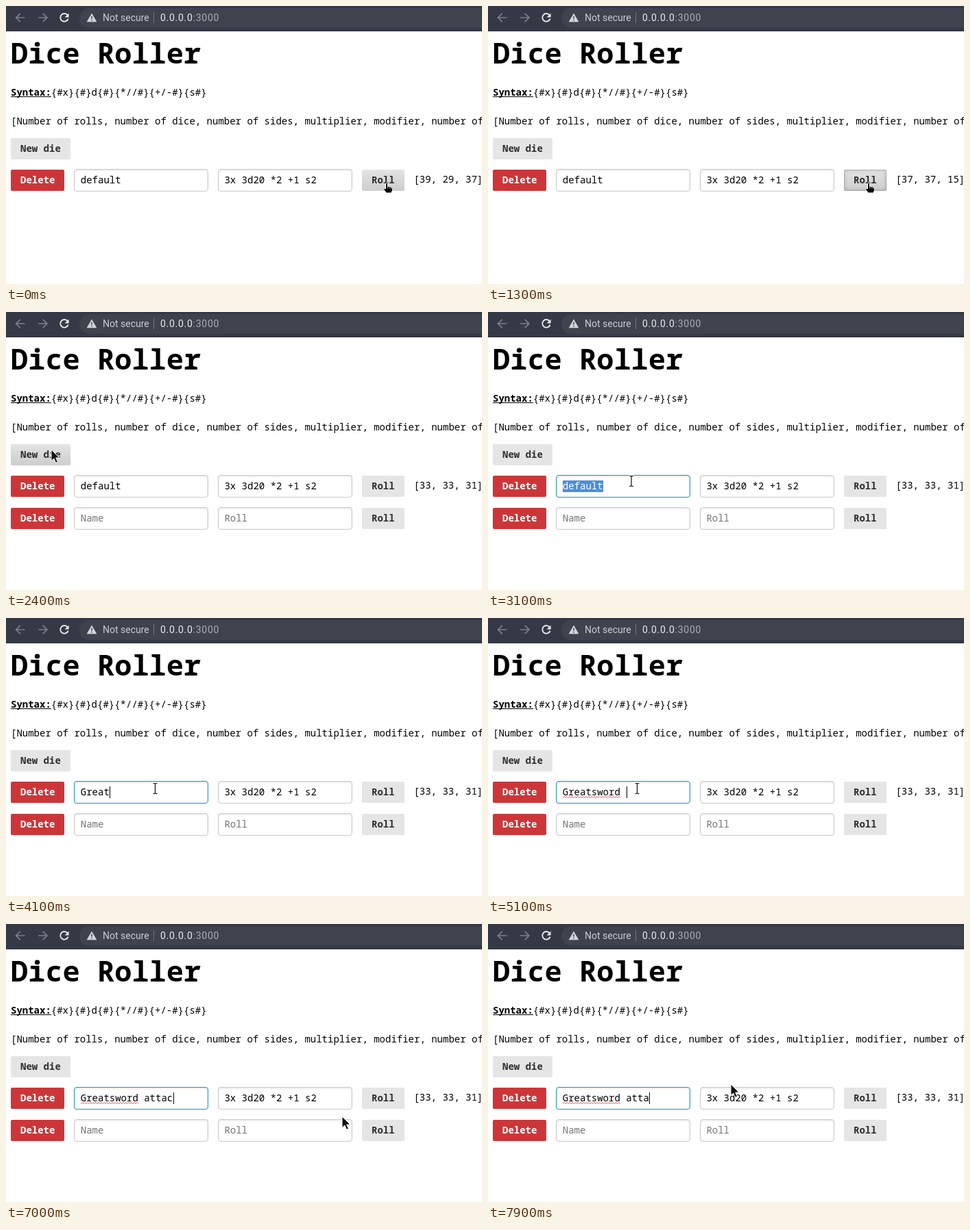
These frames come from a looping animation (694x406 px, 8000 ms). An HTML page:

```html
<!DOCTYPE html>
<html lang="en">
<head>
<meta charset="utf-8">
<title>Dice Roller</title>
<style>
  html, body { margin: 0; width: 100%; height: 100%; overflow: hidden; background: #fff; }
  #stage { position: relative; width: 694px; height: 406px; overflow: hidden; background: #fff; }
  #stage > div, #stage > svg { position: absolute; box-sizing: border-box; }
  .bar { left: 0; top: 0; width: 694px; height: 37px; background: #353945; border-bottom: 1px solid #2b2f39; }
  .pill { left: 107px; top: 3px; width: 620px; height: 29px; border-radius: 14.5px; background: #3e434e; }
  .btn { height: 31px; border-radius: 2px; background-color: #e5e5e5; }
  .red { background-color: #cc3639; }
  .hover { background-image: linear-gradient(transparent, rgba(0,0,0,.05) 40%, rgba(0,0,0,.1)); }
  .down { box-shadow: 0 0 0 1px rgba(0,0,0,.15) inset, 0 0 6px rgba(0,0,0,.2) inset; }
  .field { width: 196px; height: 33px; border: 1px solid #ccc; border-radius: 4px; box-shadow: inset 0 1px 3px #ddd; background: #fff; }
  .focus { border-color: #1e93c6; }
  svg { left: 0; top: 0; }
  text { font: 14px "Noto Sans Mono", "DejaVu Sans Mono", monospace; fill: #000; white-space: pre; }
  .b { font-weight: 700; }
  .label { font-weight: 700; fill: #2e2e2e; }
  .light { fill: #fff; }
  .hint { fill: #757575; }
  .title { font-size: 42px; font-weight: 700; }
  .ui { font: 14px Roboto, "Noto Sans", sans-serif; fill: #c9ccd1; }
  .host { letter-spacing: .72px; fill: #e8e9ec; }
  .off { display: none; }
</style>
</head>
<body>
<div id="stage">
  <div class="bar"></div>
  <div class="pill"></div>
  <div class="btn" id="newBtn" style="left:7px;top:193px;width:87px"></div>
  <svg id="art" width="694" height="406" viewBox="0 0 694 406">
    <g fill="none" stroke="#7c808a" stroke-width="1.7">
      <path d="M27.5 17H15M20.8 10.8 14.6 17l6.2 6.2"/>
      <path d="M47 17h12.5M53.7 10.8 59.9 17l-6.2 6.2"/>
      <path stroke="#e6e7ea" stroke-width="1.9" d="M89.6 13.2A5.8 5.8 0 1 0 90.6 18.6"/>
    </g>
    <path fill="#e6e7ea" d="M91.6 10.6v6h-6z"/>
    <path fill="#d3d5d9" d="M125 10.5 132.3 23.2H117.7z"/>
    <path stroke="#3e434e" stroke-width="1.5" d="M125 14.8v4M125 20v1.6"/>
    <path stroke="#737781" d="M215.500 9v16"/>
    <text class="ui" x="141" y="22">Not secure</text>
    <text class="ui host" x="225" y="22">0.0.0.0<tspan fill="#a9adb6">:3000</tspan></text>

    <text class="title" x="7" y="84">Dice Roller</text>
    <text class="b" x="7" y="131">Syntax:</text>
    <path stroke="#000" d="M7 132.500H66"/>
    <text x="65.8" y="131">{#x}{#}d{#}{*//#}{+/-#}{s#}</text>
    <text x="7" y="173">[Number of rolls, number of dice, number of sides, multiplier, modifier, number of</text>
    <text class="label" x="21" y="213">New die</text>

    <rect id="mark" x="109" y="246" width="59" height="17" fill="#4a90d9"/>
    <text id="name" x="108.8" y="259"></text>
    <path id="wave" fill="none" stroke="#e0474c" stroke-width="1"/>
    <rect id="caret" y="246" width="1" height="17"/>
    <text x="318.4" y="259">3x 3d20 *2 +1 s2</text>
    <text id="result" x="594.4" y="258"></text>

    <g id="hand" class="pointer">
      <path fill="#000" stroke="#fff" stroke-width="1" d="M-1.5 1Q0-1 1.500 1V5.500Q3 4.600 4 6Q5.700 5.300 6.500 6.800Q8.600 6.500 8.600 8.500V11L7 15H-.5L-4.500 9.800Q-4.500 7.800-1.500 9z"/>
      <path stroke="#fff" stroke-width=".7" d="M1.500 6v2.500M4 6.500v2.300M6.500 7.300v2"/>
    </g>
    <path id="arrow" class="pointer" fill="#111" stroke="#fff" stroke-width="1" d="M0 0V16.500L3.800 13 6.600 19.300 9.500 18 6.700 12H12z"/>
    <g id="beam" class="pointer" fill="none">
      <path stroke="#fff" stroke-width="3" d="M-3.500-7.500H3.500M-3.500 7.500H3.500M0-7V7"/>
      <path stroke="#111" stroke-width="1.2" d="M-3-7.500H-1L0-6.500 1-7.500H3M-3 7.500H-1L0 6.500 1 7.500H3M0-6.500V6.500"/>
    </g>
  </svg>
</div>
<script>
const $ = id => document.getElementById(id);
const LOOP = 8000, CHAR = 8.4, TEXT_X = 108.8;
const PHRASE = 'Greatsword attack';
const art = $('art');

function box(cls, x, y, w, id) {
  const el = document.createElement('div');
  el.className = cls;
  el.style.cssText = `left:${x}px;top:${y}px;` + (w ? `width:${w}px` : '');
  if (id) el.id = id;
  art.before(el);
  return el;
}
function label(cls, x, y, str) {
  const el = document.createElementNS('http://www.w3.org/2000/svg', 'text');
  el.setAttribute('class', cls);
  el.setAttribute('x', x);
  el.setAttribute('y', y);
  el.textContent = str;
  art.insertBefore(el, $('hand'));
  return el;
}
function dieRow(y, n) {
  return [
    box('btn red', 7, y + 1, 78),
    box('field', 99, y, 0, 'nameBox' + n),
    box('field', 309, y),
    box('btn', 519, y + 1, 62, 'roll' + n),
    label('b light', 21, y + 21, 'Delete'),
    label('label', 533, y + 21, 'Roll')
  ];
}
dieRow(238, 1);
const secondRow = [
  ...dieRow(285, 2),
  label('hint', 108.8, 306, 'Name'),
  label('hint', 318.4, 306, 'Roll')
];
$('wave').setAttribute('d', 'M109 262.500' + 'l2-2l2 2'.repeat(21));

// button: 0 idle, 1 hover, 2 pressed; typed: letters of PHRASE, -1 keeps the default name
const START = {
  roll: 1, add: 0, dice: '39, 29, 37', row: 0, focus: 0, mark: 0, typed: -1,
  at: ['hand', 555, 258]
};
const steps = [
  [300, { roll: 2 }],
  [400, { roll: 1, dice: '25, 41, 33' }],
  [600, { dice: '43, 27, 35' }],
  [1000, { roll: 2 }],
  [1100, { dice: '21, 45, 29' }],
  [1300, { dice: '37, 37, 15' }],
  [1500, { roll: 1, dice: '33, 33, 31' }],
  [1600, { at: ['hand', 540, 256] }],
  [1700, { roll: 0, at: ['beam', 470, 248] }],
  [1800, { at: ['arrow', 350, 232] }],
  [1900, { at: ['arrow', 220, 222] }],
  [2000, { at: ['arrow', 130, 212] }],
  [2100, { add: 1, at: ['arrow', 76, 204] }],
  [2200, { add: 2, at: ['arrow', 66, 201] }],
  [2400, { add: 1, row: 1 }],
  [2500, { at: ['arrow', 80, 211] }],
  [2600, { add: 0, at: ['arrow', 128, 229] }],
  [2700, { at: ['beam', 185, 245] }],
  [2800, { at: ['beam', 207, 248] }],
  [2900, { focus: 1 }],
  [3000, { mark: 1 }],
  [3100, { at: ['beam', 209, 247] }],
  [3300, { at: ['beam', 214, 248] }],
  [3400, { at: ['beam', 217.5, 249] }],
  [3500, { mark: 0, typed: 1 }],
  [6800, { at: ['beam', 260, 255] }],
  [6900, { at: ['arrow', 385, 274] }],
  [7000, { at: ['arrow', 490, 281] }],
  [7100, { at: ['beam', 450, 258] }],
  [7200, { at: ['arrow', 375, 228] }],
  [7300, { at: ['arrow', 354, 234] }]
];
// [time, number of letters in the name field]
const typing = [
  [3700, 2], [3900, 3], [4000, 4], [4100, 5], [4300, 6], [4500, 7], [4700, 9], [4900, 10],
  [5100, 11], [5300, 13], [5500, 14], [5600, 15], [5700, 16], [6100, 14], [6200, 13],
  [6400, 14], [6500, 16], [7500, 15], [7600, 14], [7800, 13], [7900, 15]
];
for (const [t, typed] of typing) steps.push([t, { typed }]);
steps.sort((a, b) => a[0] - b[0]);

const show = (el, on) => el.classList.toggle('off', !on);
function press(el, level) {
  el.classList.toggle('hover', level > 0);
  el.classList.toggle('down', level > 1);
}

function draw(t) {
  const s = { ...START };
  for (const [time, change] of steps) if (time <= t) Object.assign(s, change);

  press($('roll1'), s.roll);
  press($('newBtn'), s.add);
  $('result').textContent = `[${s.dice}]`;
  secondRow.forEach(el => show(el, s.row));

  const name = s.typed < 0 ? 'default' : PHRASE.slice(0, s.typed);
  $('name').textContent = name;
  $('name').classList.toggle('light', !!s.mark);
  $('nameBox1').classList.toggle('focus', !!s.focus);
  $('caret').setAttribute('x', Math.ceil(TEXT_X + name.length * CHAR));
  show($('caret'), s.focus && !s.mark);
  show($('mark'), s.mark);
  show($('wave'), s.typed > 10);

  const [kind, x, y] = s.at;
  for (const el of document.querySelectorAll('.pointer')) show(el, el.id === kind);
  $(kind).setAttribute('transform', `translate(${x} ${y})`);
}

const begin = performance.now();
function tick() {
  draw((performance.now() - begin) % LOOP);
  requestAnimationFrame(tick);
}
tick();
</script>
</body>
</html>
```
